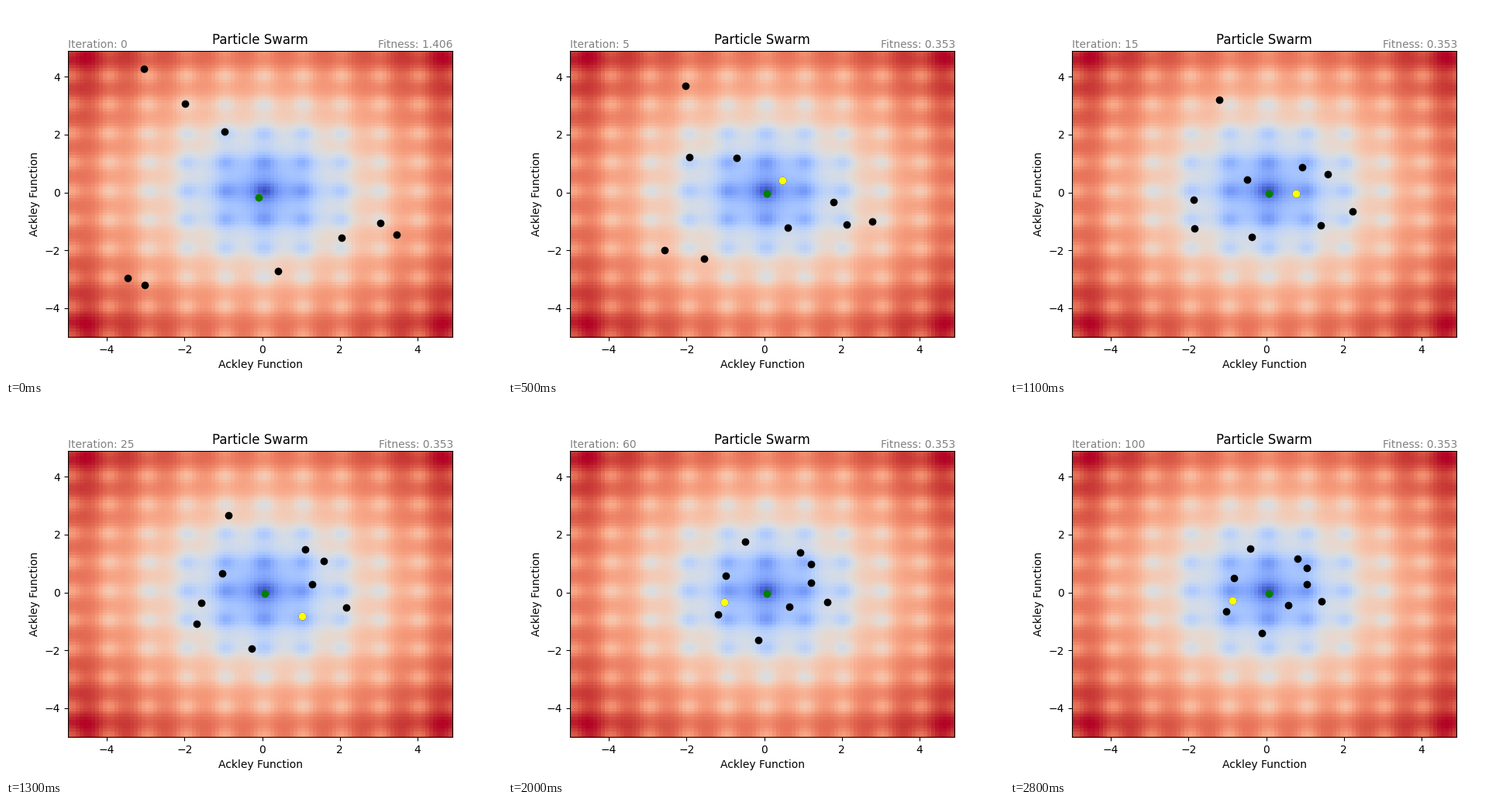
Write a matplotlib script that moves like this. It is 640 px wide and 480 px high and loops after 2900 ms.

```python
import numpy as np
import matplotlib.pyplot as plt
from matplotlib.animation import FuncAnimation

LOW, HIGH = -5.0, 4.9
STEPS = list(range(11)) + list(range(15, 101, 5))
PULLED, SETTLED, LAST = 15, 40, 100  # iterations that end each phase


def to_data(px):
    """Convert stage pixels to axes coordinates."""
    unit = (np.asarray(px, float) - [80, 427.2]) / [496, -369.6]
    return LOW + unit * (HIGH - LOW)


# Each particle: where it starts, is pulled to, and settles (stage pixels)
SWARM = to_data([
    [(178, 81), (270, 121), (297, 153)],
    [(231, 126), (237, 250), (261, 256)],
    [(282, 162), (306, 224), (264, 211)],
    [(326, 247), (377, 208), (391, 172)],
    [(483, 280), (401, 283), (372, 265)],
    [(504, 295), (442, 265), (438, 257)],
    [(433, 299), (410, 217), (410, 191)],
    [(351, 342), (369, 242), (409, 223)],
    [(157, 351), (238, 287), (250, 278)],
    [(179, 360), (312, 298), (320, 321)],
])
START, MIDDLE, ORBIT = SWARM.transpose(1, 0, 2)
BEST = to_data((334, 242))


def ackley(x, y):
    waves = np.cos(2 * np.pi * x) + np.cos(2 * np.pi * y)
    return (20 - 20 * np.exp(-0.2 * np.sqrt(0.5 * (x**2 + y**2)))
            + np.e - np.exp(0.5 * waves))


def ease_out(step, begin, end, power=2):
    t = np.clip((step - begin) / (end - begin), 0, 1)
    return 1 - (1 - t)**power


def positions(step):
    """Pull the particles in, let them settle, then contract to the best."""
    pos = START + (MIDDLE - START) * ease_out(step, 0, PULLED)
    pos = pos + (ORBIT - MIDDLE) * ease_out(step, PULLED, SETTLED)
    shrink = 1 - 0.35 * ease_out(step, SETTLED, LAST, power=3)
    return BEST + (pos - BEST) * shrink


fig, ax = plt.subplots(figsize=(6.4, 4.8), dpi=100)
edges = np.linspace(LOW, HIGH, 100)
gx, gy = np.meshgrid(edges[:-1], edges[:-1])
ax.pcolormesh(edges, edges, ackley(gx, gy), cmap="coolwarm", shading="flat")
ax.set(xlim=(LOW, HIGH), ylim=(LOW, HIGH), title="Particle Swarm",
       xlabel="Ackley Function", ylabel="Ackley Function")

dots, = ax.plot([], [], "o", color="black")
current, = ax.plot([], [], "o", color="yellow")
best, = ax.plot([], [], "o", color="green")
label = dict(color="gray", transform=ax.transAxes)
count = ax.text(0, 1.01, "", **label)
fitness = ax.text(1.002, 1.01, "", ha="right", **label)


def update(i):
    step = STEPS[i]
    pos = positions(step)
    lead = pos[np.argmin(ackley(*pos.T))]
    top, score = (lead, 1.406) if step == 0 else (BEST, 0.353)
    dots.set_data(*pos.T)
    current.set_data(*lead[:, None])
    best.set_data(*top[:, None])
    count.set_text(f"Iteration: {step}")
    fitness.set_text(f"Fitness: {score:.3f}")
    return dots, current, best, count, fitness


anim = FuncAnimation(fig, update, frames=len(STEPS), interval=100, repeat=True)
plt.show()
```
